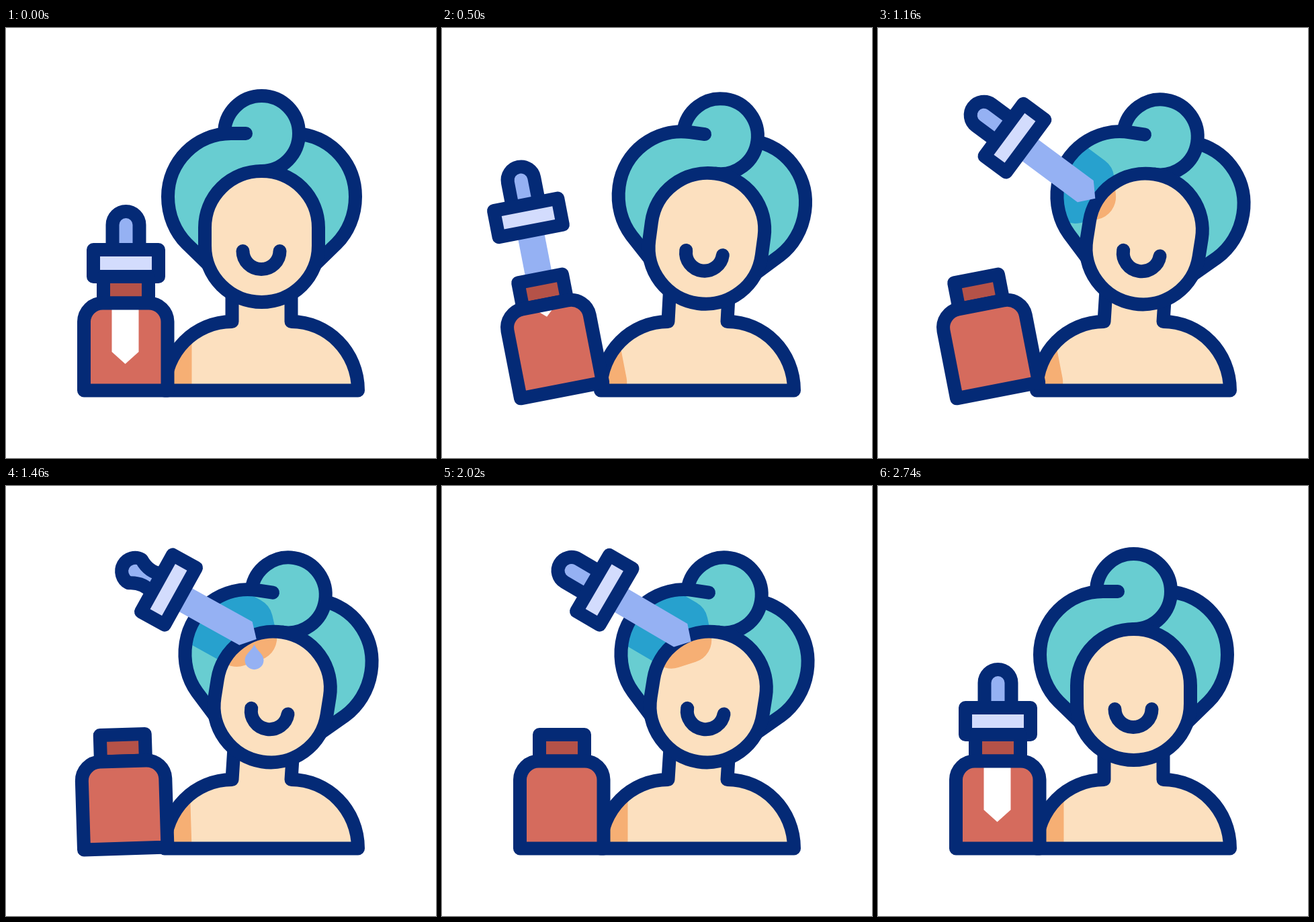
Recreate the animation shown at these times as an HTML page with a canvas. Size 640 px wide and 640 px high, loop 3000 ms.

```html
<!DOCTYPE html>
<html lang="en">
<head>
<meta charset="utf-8">
<title>Serum care</title>
<style>
  html, body { margin: 0; width: 100%; height: 100%; overflow: hidden; background: #fff; }
  canvas { display: block; width: 640px; height: 640px; }
</style>
</head>
<body>
<canvas id="stage" width="640" height="640"></canvas>
<script>
const ctx = document.getElementById('stage').getContext('2d');
const LOOP = 3000;
const NAVY = '#042a76', SKIN = '#fce0bf', SKIN_SHADE = '#f6af74';
const TOWEL = '#68cdd1', TOWEL_SHADE = '#27a1ce';
const RED = '#d56b5d', DARK_RED = '#b55248', BLUE = '#95b1f3', PALE = '#d3dcfd';

const path = d => new Path2D(d);

const face = path('M296 297A84.5 84 0 0 1 465 297V324A84.5 84 0 0 1 296 324Z');
const mouth = path('M352.5 332A27.5 27 0 0 0 407.5 332');
const towelFill = path('M335 157C283 157 241 199 241 251C241 279 252 304 269 321L302 353H459L492 321C509 304 520 279 520 251C520 199 478 157 426 157ZM325 157A55.5 56 0 0 0 436 157A55.5 56 0 0 0 325 157Z');
const towelLines = path('M357 157H335C283 157 241 199 241 251C241 279 252 304 269 321L302 353M440 158C486 165 520 203 520 251C520 279 509 304 492 321L459 353M325 157A55.5 56 0 0 1 436 157A55.5 56 0 0 1 380.5 213');
const bottleBody = path('M116 539.5V437A28 28 0 0 1 144 409.5H212A28 28 0 0 1 240.5 437V539.5Z');
const bottleNeck = path('M145 370H212V409.5H145Z');
const pipette = path('M-21 0V132L-1 150L19 132V0Z');
const cap = path('M-48.5 -20H48.5V20H-48.5Z');
const dropShape = path('M0 -24C3 -14 14 -10 14 0A14 14 0 0 1 -14 0C-14 -10 -3 -14 0 -24Z');

// Keys are time, value, time, value...; a smooth curve without overshoot.
function curve(...keys) {
  const n = keys.length / 2;
  const T = i => keys[2 * i], V = i => keys[2 * i + 1];
  const slope = i => (V(i + 1) - V(i)) / (T(i + 1) - T(i));
  const tangent = i => {
    if (i === 0 || i === n - 1) return 0;
    const a = slope(i - 1), b = slope(i);
    return a * b > 0 ? 2 * a * b / (a + b) : 0;
  };
  return t => {
    if (t <= T(0)) return V(0);
    if (t >= T(n - 1)) return V(n - 1);
    let i = 0;
    while (t >= T(i + 1)) i++;
    const h = T(i + 1) - T(i), u = (t - T(i)) / h, w = 1 - u;
    return V(i) * w * w * (1 + 2 * u) + V(i + 1) * u * u * (3 - 2 * u)
      + h * u * w * (w * tangent(i) - u * tangent(i + 1));
  };
}

const headTilt = curve(200, 0, 500, 7.65, 680, 9, 2180, 9, 2380, 5.85, 2700, 0);
const bottleTilt = curve(200, 0, 460, -11, 1280, -11, 1460, -1.8, 1550, 0);
const lift = curve(200, 0, 500, 72, 740, 175);
const dropperX = curve(740, 108.4, 900, 103.5, 1300, 242, 1990, 242, 2380, 215.3, 2490, 180, 2560, 178.5);
const dropperY = curve(740, 181.7, 900, 187.5, 1300, 154.5, 1990, 154.5, 2380, 182.5, 2490, 215, 2740, 350);
const dropperTilt = curve(740, -11, 900, -24, 1300, -61, 1990, -61, 2380, 14.5, 2520, 0);
const squeeze = curve(1300, 0, 1440, 1, 1520, 1, 1760, 0);
const dropY = curve(1340, 232, 1460, 259, 1760, 312);
const dropSize = curve(1340, 0, 1430, 1, 1600, 1, 1780, 0);

function scoped(draw) {
  ctx.save();
  draw();
  ctx.restore();
}

function turn(x, y, degrees) {
  ctx.translate(x, y);
  ctx.rotate(degrees * Math.PI / 180);
}

function paint(shape, fill, line = NAVY, width = 20) {
  if (fill) {
    ctx.fillStyle = fill;
    ctx.fill(shape);
  }
  if (line) {
    ctx.strokeStyle = line;
    ctx.lineWidth = width;
    ctx.stroke(shape);
  }
}

function bottleFrame(t) {
  turn(178, 540, bottleTilt(t));
  ctx.translate(-178, -540);
}

function headFrame(t) {
  turn(366, 412, headTilt(t));
  ctx.translate(-366, -412);
}

function dropperFrame(t) {
  if (t < 740) {
    bottleFrame(t);
    ctx.translate(178.5, 350 - lift(t));
  } else {
    turn(dropperX(t), dropperY(t), dropperTilt(t));
  }
}

function bulb(t) {
  const s = squeeze(t), base = 20 - 4 * s, waist = 20 - 12 * s;
  return path(`M${-base} -20Q${-waist} -38 -20 -57A20 20 0 0 1 20 -57Q${waist} -38 ${base} -20`);
}

// Casts the dropper's shade on one part of the head.
function shadeHead(t, area, color) {
  scoped(() => {
    const plain = ctx.getTransform();
    headFrame(t);
    ctx.clip(area);
    ctx.setTransform(plain);
    dropperFrame(t);
    paint(cap, color, color, 72);
    paint(bulb(t), color, color, 72);
    ctx.translate(0, -4);
    paint(pipette, color, color, 68);
  });
}

function drawBody(t) {
  const lean = headTilt(t) / 3;
  const body = path(`M${336.5 + lean} 390L336.5 437C281 437 236 482 236 539.5H524C524 482 479 437 424.5 437L${424.5 + lean} 390`);
  paint(body, SKIN, null);
  scoped(() => {
    ctx.clip(body);
    bottleFrame(t);
    paint(bottleBody, SKIN_SHADE, SKIN_SHADE, 72);
  });
  paint(body);
}

function drawHead(t) {
  const inHead = draw => scoped(() => { headFrame(t); draw(); });
  inHead(() => paint(towelFill, TOWEL, null));
  shadeHead(t, towelFill, TOWEL_SHADE);
  inHead(() => {
    paint(towelLines);
    paint(face, SKIN, null);
  });
  shadeHead(t, face, SKIN_SHADE);
  inHead(() => {
    paint(face);
    paint(mouth);
  });
}

function drawDrop(t) {
  scoped(() => {
    ctx.translate(369.5, dropY(t));
    ctx.scale(dropSize(t), dropSize(t));
    paint(dropShape, BLUE, null);
  });
}

function drawDropper(t) {
  scoped(() => {
    dropperFrame(t);
    paint(pipette, BLUE, null);
    paint(bulb(t), BLUE);
    paint(cap, PALE);
  });
}

function drawBottle(t) {
  scoped(() => {
    const plain = ctx.getTransform();
    bottleFrame(t);
    paint(bottleNeck, DARK_RED);
    paint(bottleBody, RED, null);
    scoped(() => {
      ctx.clip(bottleBody);
      ctx.setTransform(plain);
      dropperFrame(t);
      paint(pipette, '#fff', null);
    });
    paint(bottleBody);
  });
}

function frame() {
  const t = performance.now() % LOOP;
  ctx.fillStyle = '#fff';
  ctx.fillRect(0, 0, 640, 640);
  ctx.lineCap = ctx.lineJoin = 'round';
  drawBody(t);
  drawHead(t);
  if (dropSize(t) > 0) drawDrop(t);
  drawDropper(t);
  drawBottle(t);
  requestAnimationFrame(frame);
}
frame();
</script>
</body>
</html>
```
